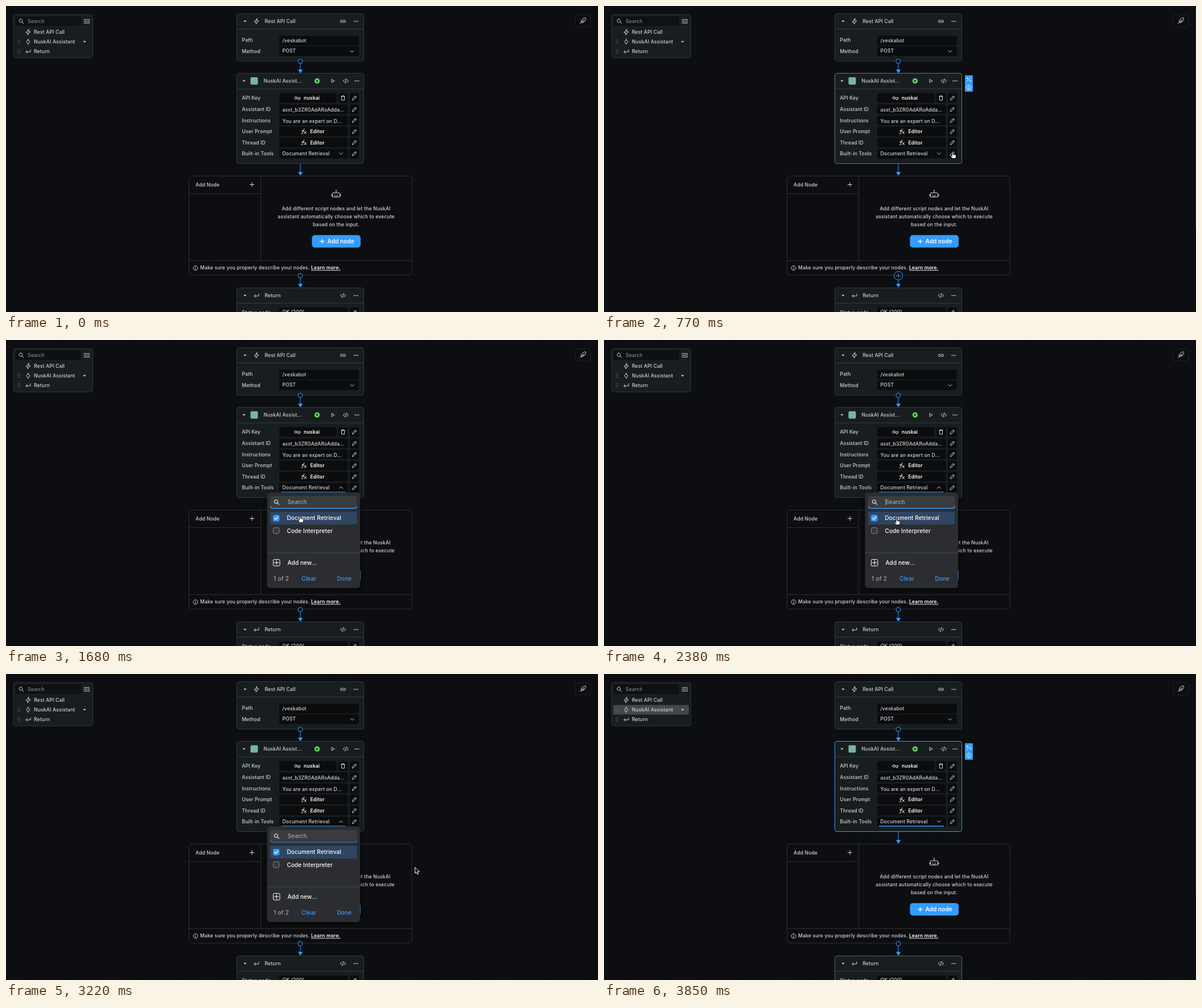
Animation, 1040 px wide and 539 px high, one loop 4.13 s. Source, as an HTML page:

```html
<!DOCTYPE html>
<html lang="en">
<head>
<meta charset="utf-8">
<title>Node editor</title>
<style>
html, body { margin: 0; width: 100%; height: 100%; overflow: hidden; background: #0d0e11; }
svg { display: block; width: 1040px; height: 539px; }
text { font: 500 8.6px Inter, sans-serif; letter-spacing: .15px; fill: #d3d5d7; white-space: pre; }
.big { font-size: 10px; letter-spacing: .1px; fill: #fff; }
.bold { font-weight: 600; fill: #fff; }
.dim { fill: #85888b; }
.blue { fill: #3d9bff; }
.ic { fill: none; stroke: #d3d5d7; stroke-width: 1; stroke-linecap: round; stroke-linejoin: round; }
</style>
</head>
<body>
<svg id="stage" viewBox="0 0 1040 539"></svg>
<script>
const BLUE = '#339cff', BG = '#0d0e11', CARD = '#181d1f', EDGE = '#343a3d', FIELD = '#0b0c0e';

const icons = {
  bolt: 'M1-5-4 1H-.5L-1 5 4-1H.5Z',
  enter: 'M4-3V.8H-4M-1.5-1.7-4 .8l2.5 2.5',
  pencil: 'M-3.5 3.5l.5-2.3L1.8-3.6l1.8 1.8L-1.2 3ZM.7-2.5l1.8 1.8',
  code: 'M-2-2.7-4.6 0-2 2.7M2-2.7 4.6 0 2 2.7M.9-3.8-.9 3.8',
  plus: 'M-3.7 0H3.7M0-3.7V3.7',
  chevron: 'M-3-1.5 0 1.5 3-1.5',
  play: 'M-2-2.7 2.6 0-2 2.7Z',
  link: 'M-1-2H-2.5a2 2 0 0 0 0 4H-1M1-2H2.5a2 2 0 0 1 0 4H1M-1.7 0H1.7',
  lens: 'M-1-4a3 3 0 1 0 .01 0M1.2 1.2 4 4',
  list: 'M-5-3H4.5M-5 0H1M-5 3H4.5M4.5-1.5 2.7 0 4.5 1.5',
  trash: 'M-3.3-2.8H3.3M-1.2-2.8V-4H1.2v1.2M-2.5-2.8V4h5V-2.8',
  key: 'M-3-2.3a2.3 2.3 0 1 0 .01 0M-.8-.8H5V1.4H3.5V3H1.5V1.4H-.8M-3.2 0h.4',
  fx: 'M-4.5 4.2c2 .8 2-1 2.7-4.5S-.7-5 1-4M-4-1H.5M.5 0 4 4M4 0 .5 4',
  node: 'M0-2.8a2.8 2.8 0 1 0 .01 0M0-5v2.2M0 2.8V5',
  feather: 'M-5 5 2-2M-3 3V-.5L1-4.5C3-5.3 5-5 5-5s.3 2-.5 4L.5 3ZM-1 1H2.5',
  robot: 'M-5-2H5a1.5 1.5 0 0 1 1.5 1.5V5.5h-13V-.5A1.5 1.5 0 0 1-5-2M0-2V-5.5M-1-6H1M-6.5 1H-8v2.5h1.5M6.5 1H8v2.5H6.5M-2.8 1.3v.6M2.8 1.3v.6M-2 3.8H2',
  info: 'M0-4a4 4 0 1 0 .01 0M0-.3V2M0-2v.1',
  wand: 'M-3.5 3.5 2.2-2.2M-2.5-3v2M-3.5-2h2M3 1.2v2M2 2.2h2M3-3.6l.2.2',
  check: 'M-3 .2-1 2.3 3.2-2.2'
};

const icon = (name, x, y, attr = '') =>
  `<path class="ic" d="${icons[name]}" transform="translate(${x} ${y})" ${attr}/>`;
const text = (x, y, s, attr = '') => `<text x="${x}" y="${y}" ${attr}>${s}</text>`;
const box = (x, y, r, b, fill, edge = 'none', rx = 3, attr = '') =>
  `<rect x="${x}" y="${y}" width="${r - x}" height="${b - y}" rx="${rx}" fill="${fill}" stroke="${edge}" ${attr}/>`;
const line = (d, color = EDGE, attr = '') => `<path d="${d}" stroke="${color}" fill="none" ${attr}/>`;
const caret = (x, y) => `<path d="M${x - 2.7} ${y - 1.3}h5.4l-2.7 2.8Z" fill="#d3d5d7"/>`;
const dots = (x, y) => [-3, 0, 3].map(d => `<circle cx="${x + d}" cy="${y}" r=".9" fill="#d3d5d7"/>`).join('');
const grip = y => [-3, 0, 3].map(d => [21.5, 24.5].map(x =>
  `<circle cx="${x}" cy="${y + d}" r=".75" fill="#6b6f72"/>`).join('')).join('');
const editButton = y => box(604, y - 8.5, 620, y + 8.5, FIELD) + icon('pencil', 612, y);
const arrow = (y1, y2) => line(`M517 ${y1}V${y2 - 4}`, BLUE) +
  `<path d="M513 ${y2 - 6.5}h8.4l-4.2 6.5Z" fill="${BLUE}"/>`;

function row(y, label, content) {
  return text(414.5, y + 3, label) + box(480, y - 8.5, 600.5, y + 8.5, FIELD) + content + editButton(y);
}
const editor = y => icon('fx', 523.5, y, 'style="stroke:#fff"') + text(534.5, y + 3, 'Editor', 'class="bold"');

const sidebar = box(13, 15, 152.5, 91.5, CARD, '#2d3235', 4) +
  box(16.5, 18.5, 132, 35, '#0e1012') + icon('lens', 27, 27) +
  text(38, 30.2, 'Search', 'class="dim"') + icon('list', 142, 27) +
  box(16, 54.5, 149, 71.5, '#454749', 'none', 2, 'id="picked"') +
  icon('bolt', 39, 46) + text(49, 49, 'Rest API Call') +
  grip(63) + icon('node', 39, 63) + text(49, 66, 'NuskAI Assistant') + caret(138, 63) +
  grip(80) + icon('enter', 39, 80) + text(49, 83, 'Return');

const restNode = box(405.5, 13.5, 628.5, 97, CARD, EDGE, 4) + line('M406 40.5H628') +
  caret(420, 27) + icon('bolt', 440, 27) + text(454.5, 30, 'Rest API Call') +
  icon('link', 592, 27) + dots(614.5, 27) +
  text(414.5, 63, 'Path') + box(480, 52.5, 620, 69.5, FIELD) + text(485.5, 64.3, '/veskabot') +
  text(414.5, 82.7, 'Method') + box(480, 71, 620, 88, FIELD) + text(485.5, 82, 'POST') + icon('chevron', 608, 80);

const assistant = box(405.5, 118.5, 628.5, 277.5, CARD, EDGE, 4, 'id="card"') + line('M406 146H628') +
  caret(418, 132) + box(429.5, 125.5, 442.5, 138.5, '#78b5a5', 'none', 2) +
  text(452.5, 135, 'NuskAI Assist...') +
  `<circle cx="546.5" cy="132" r="4.7" fill="#5fcf60"/>` +
  `<path d="M545.2 129.8l3.6 2.2-3.6 2.2Z" fill="${CARD}"/>` +
  icon('play', 574.5, 132) + icon('code', 597, 132) + dots(616.5, 132) +
  text(414.5, 165, 'API Key') + box(480, 153.5, 581, 170.5, FIELD) + icon('key', 512, 162) +
  text(523, 165, 'nuskai', 'class="bold"') + box(584, 153.5, 600.5, 170.5, FIELD) +
  icon('trash', 592, 162) + editButton(162) +
  row(182, 'Assistant ID', text(485.5, 186, 'asst_b3ZR0AdARoAdda...')) +
  row(201.5, 'Instructions', text(485.5, 205.7, 'You are an expert on D...')) +
  row(221, 'User Prompt', editor(221)) +
  row(240.5, 'Thread ID', editor(240.5)) +
  row(260, 'Built-in Tools', text(485.5, 263, 'Document Retrieval') +
    `<g id="chevron">${icon('chevron', 0, 0)}</g>`) +
  line('M-57 0H57', BLUE, 'id="underline" stroke-width="1.6"');

const centered = 'text-anchor="middle"';
const group = box(321.5, 299.5, 713, 474, BG, '#2b2f32', 5) +
  line('M447.5 300V448.5M322 330.5H447.5M322 448.5H712.5', '#2b2f32') +
  text(333, 318, 'Add Node') + icon('plus', 432, 314.5) + icon('robot', 580, 331) +
  text(580, 359.7, 'Add different script nodes and let the NuskAI', centered) +
  text(580, 373.7, 'assistant automatically choose which to execute', centered) +
  text(580, 387.7, 'based on the input.', centered) +
  box(537.5, 403.5, 623, 425.5, BLUE, 'none', 5) +
  icon('plus', 555.5, 414.5, 'style="stroke:#fff;stroke-width:1.3"') +
  text(564.5, 418, 'Add node', 'class="big bold"') +
  icon('info', 333, 461.5) + text(341, 464.3, 'Make sure you properly describe your nodes.') +
  text(536, 464.3, 'Learn more.', 'class="bold" text-decoration="underline"');

const returnNode = box(405.5, 496.5, 628.5, 560, CARD, EDGE, 4, 'id="last"') + line('M406 523.5H628') +
  caret(420, 510) + icon('enter', 440, 510) + text(454.5, 513, 'Return') +
  icon('code', 592, 510) + dots(614.5, 510) +
  row(539.5, 'Status node', text(485.5, 542, 'OK (200)'));

const popup = `<g id="popup">` +
  box(458.5, 268.5, 622, 437, '#2b2d30', 'none', 5, 'style="filter:drop-shadow(0 3px 5px #0009)"') +
  box(464, 275, 616.5, 297, '#3a3c3f', 'none', 4) +
  line('M464.5 292.5Q464.5 296.5 468 296.5H612.5Q616 296.5 616 292.5', BLUE, 'id="focus" stroke-width="1.4"') +
  icon('lens', 475.5, 285.8, 'style="stroke:#c5c7c9;stroke-width:1.4"') +
  text(494.5, 289.2, 'Search', 'class="big" style="fill:#a2a4a7"') +
  line('M495 280V291', '#d3d5d7', 'id="caret" stroke-width=".8"') +
  box(464, 302.5, 616.5, 325, '#2f4562', 'none', 2) +
  box(469, 308, 480.5, 319.5, BLUE, 'none', 3) +
  icon('check', 474.7, 313.7, 'style="stroke:#fff;stroke-width:1.3"') +
  text(493.5, 317.3, 'Document Retrieval', 'class="big"') +
  box(469.5, 330.5, 480, 341, '#36383b', '#85888b', 3) +
  text(493.5, 339.7, 'Code Interpreter', 'class="big"') +
  line('M458.5 375H622', '#45484b') +
  box(469.5, 386.5, 481, 398, 'none', '#fff', 2) +
  icon('plus', 475.2, 392.2, 'style="stroke:#fff"') +
  text(494.5, 395.6, 'Add new...', 'class="big"') +
  text(470, 423.6, '1 of 2', 'class="big" style="fill:#a2a4a7;letter-spacing:.3px"') +
  text(519, 423.6, 'Clear', 'class="big blue"') + text(581.5, 423.6, 'Done', 'class="big blue"') + `</g>`;

const toolbar = `<g id="toolbar">` + box(634, 122, 648, 151, BLUE, 'none', 1) +
  icon('wand', 641, 129.5, 'style="stroke:#fff"') + icon('info', 641, 143.5, 'style="stroke:#fff"') +
  line('M1039.5 0V390', '#24272a') + `</g>`;

const port = `<circle id="port" cx="517" cy="475" fill="${BG}" stroke="${BLUE}"/>` +
  `<g id="portPlus">${icon('plus', 0, 0, `style="stroke:${BLUE}"`)}</g>`;

const pointers = `<g id="pointer" stroke="#fff" stroke-linejoin="round">
  <path id="tip" d="M0 0V10.5L2.5 8.2 4.3 12.3 6.2 11.5 4.5 7.5H8Z" fill="#000" stroke-width="1"/>
  <path id="hand" d="M-1 .5Q0-.7 1 .5V3.5Q2.2 2.9 3 3.9 4.2 3.4 4.7 4.5 6 4.3 6 5.6V7.5L5 10.5H-.5L-3.4 6.8Q-3.4 5.3-1.6 6.1L-1 6.7Z" fill="#fff" stroke="#000" stroke-width=".8"/>
</g>`;

stage.innerHTML = `<defs><pattern id="grid" width="13" height="13" patternUnits="userSpaceOnUse">
  <circle cx="4" cy="6" r=".6" fill="#202326"/></pattern></defs>` +
  box(0, 0, 1040, 539, BG, 'none', 0) + box(0, 0, 1040, 539, 'url(#grid)', 'none', 0) +
  sidebar + box(999.5, 15.5, 1027, 37, BG, '#1f2225', 4) + icon('feather', 1013.5, 26) +
  restNode + assistant + group + returnNode +
  arrow(101, 118.5) + `<circle cx="517" cy="97.5" r="4" fill="${BG}" stroke="${BLUE}"/>` +
  arrow(278, 299) + arrow(479, 496) + port + toolbar + popup + pointers;

const $ = id => document.getElementById(id);
const show = (id, on) => $(id).setAttribute('visibility', on ? 'visible' : 'hidden');
const set = (id, name, value) => $(id).setAttribute(name, value);
const ramp = (t, from, length) => Math.min(1, Math.max(0, (t - from) / length));
const easeOut = u => 1 - (1 - u) ** 3;

// Pointer stops: time, x, y
const path = [
  [0, 1060, 335], [70, 1032, 333], [350, 800, 318], [560, 642, 285], [700, 612.5, 258], [840, 612.5, 258],
  [1120, 594, 258], [1500, 594, 258], [1680, 516.5, 311], [2030, 517, 313], [2170, 517, 313],
  [2380, 514, 315], [2660, 516, 318], [2940, 718.5, 340.5], [3220, 718.5, 340.5],
  [3570, 600, 495], [3850, 588, 541]
];

function pointerAt(t) {
  const i = Math.max(1, path.findIndex(stop => stop[0] >= t));
  const [a, b] = [path[i - 1], path[i]];
  const u = ramp(t, a[0], b[0] - a[0]), k = u * u * (3 - 2 * u) * .4 + u * .6;
  return [a[1] + (b[1] - a[1]) * k, a[2] + (b[2] - a[2]) * k];
}

const OPEN = 1120, BLUR = 3080, CLOSE = 3230, SELECT = 3290;

function draw(t) {
  const selected = t >= SELECT, hovered = t >= 630 && t < OPEN;
  set('card', 'stroke', selected ? BLUE : hovered ? '#6d7377' : EDGE);
  set('last', 'stroke', t >= 3570 ? '#5d6367' : EDGE);
  show('picked', selected);
  show('toolbar', selected || (t >= 560 && t < OPEN));

  const grow = ramp(t, 560, 140) - ramp(t, OPEN, 140);
  set('port', 'r', 4 + 3.5 * grow);
  set('portPlus', 'transform', `translate(517 475) scale(${.35 + .65 * grow})`);
  show('portPlus', grow > 0);

  const e = easeOut(ramp(t, OPEN, 240));
  set('popup', 'transform', `translate(540 268.5) scale(${.92 + .08 * e} ${.845 + .155 * e}) translate(-540 -268.5)`);
  set('popup', 'opacity', ramp(t, OPEN, 120) - ramp(t, CLOSE, 150));
  set('focus', 'stroke-opacity', 1 - .45 * ramp(t, BLUR, 140));
  show('caret', t >= OPEN && t < BLUR && (t - OPEN) % 1060 < 530);
  set('underline', 'transform', `translate(540 268) scale(${easeOut(ramp(t, OPEN, 140))} 1)`);
  set('chevron', 'transform', `translate(588.5 260) rotate(${180 * (ramp(t, OPEN, 140) - ramp(t, CLOSE, 140))})`);

  const hand = (t >= 630 && t < OPEN) || (t >= 1600 && t < 2800);
  set('pointer', 'transform', `translate(${pointerAt(t)})`);
  show('hand', hand);
  show('tip', !hand);
}

function tick() {
  draw(Math.min(3850, Math.floor(performance.now() % 4130 / 70) * 70));
  requestAnimationFrame(tick);
}
tick();
</script>
</body>
</html>
```
